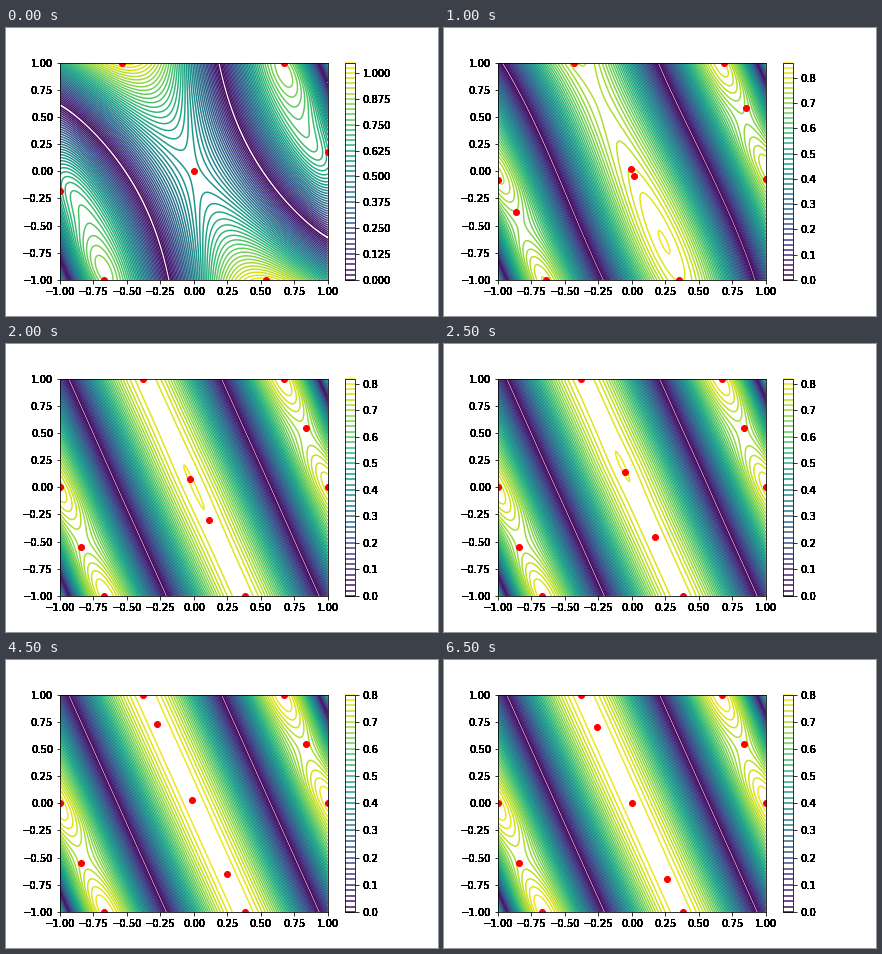
Write a matplotlib script that moves like this. It is 432x288 px and loops after 7000 ms.

```python
import numpy as np
import matplotlib.pyplot as plt
from matplotlib.animation import FuncAnimation

SLOPE = 0.365
PEAK = 0.797
VALLEY = 1.04

Y, X = np.mgrid[-1:1:201j, -1:1:201j]
U = X + SLOPE * Y


def settled_error():
    """Wave across U whose two valleys each have a saddle half way along."""
    v = U ** 2
    start = (PEAK + 0.8) / VALLEY ** 2
    wave = -0.8 + (v - VALLEY) ** 2 * (start + 0.28 * v)
    side = np.exp(-((np.abs(U) - 1.03) / 0.17) ** 2)
    return wave + 0.09 * side * np.sin(np.pi * Y) ** 2


BASE = settled_error()
QUAD = 0.4 * X ** 2 - 0.37 * X * Y + 0.25 * Y ** 2 - 0.24
CUBIC = (0.04 - 0.588 * Y + 0.456 * Y ** 3
         + U * (0.3 - 0.09 * Y - 0.65 * Y ** 2)
         + 0.77 * U ** 2 * Y - 0.33 * U ** 3)


def error(k):
    if k == 0:
        return BASE + QUAD
    if k < 3:
        return BASE + CUBIC * 0.15 ** (k - 1)
    if k < 8:
        # a small rise on the crest swings to the middle and shrinks
        j = k - 3
        mid = -1.05 * np.cos(np.pi * j / 2) * np.exp(-0.85 * j)
        width = 0.6 * 0.66 ** j
        return BASE + 0.004 * np.exp(-((Y - mid) / width) ** 2)
    return BASE


def mirrored(half):
    half = np.array(half)
    return np.vstack([half, -half])


FIRST = np.vstack([mirrored([(-0.54, 1), (0.67, 1), (1, 0.18)]), [(0, 0)]])
SECOND = np.array([(0.75, 1), (1, 0), (1, -0.33), (-0.09, 0.43), (0.2, -0.42),
                   (-1, -0.03), (-0.6, -1), (0.28, -1)])
SETTLED = mirrored([(-0.38, 1), (0.67, 1), (0.84, 0.545), (1, 0)])
LOOSE = np.array([(-0.42, 1), (0.68, 1), (0.85, 0.57), (1, -0.05),
                  (0.36, -1), (-0.65, -1), (-0.86, -0.42), (-1, -0.06)])


def crest(k):
    """Heights of the points on the central crest."""
    if k < 7:
        j = k - 3
        return np.array([0.02 + 0.06 * j, -0.14 - 0.16 * j])
    swing = np.exp(-0.6 * (k - 7)) * np.cos(np.pi * (k - 7) / 2)
    return np.array([0.7, 0, -0.7]) - np.array([0.1, 0.1, 0.15]) * swing


def points(k):
    if k < 2:
        return (FIRST, SECOND)[k]
    loose = max(0, 1 - 0.4 * (k - 3)) if k < 4 else 0
    outer = np.clip(SETTLED + loose * (LOOSE - SETTLED), -1, 1)
    y = crest(k)
    return np.vstack([outer, np.column_stack([-0.375 * y, y])])


def levels(top):
    step = 0.025 if top > 1 else 0.02
    return step * np.arange(np.ceil(top / step - 1e-6) + 1)


def harden(labels):
    """Paint each label many times so that its soft edges turn solid."""
    for label in labels:
        def repeat(renderer, draw=label.draw):
            for _ in range(20):
                draw(renderer)
        label.draw = repeat


plt.rcParams.update({"font.family": "DejaVu Sans", "font.size": 10})
fig = plt.figure(figsize=(6, 4), dpi=72, facecolor="white")
TICKS = np.linspace(-1, 1, 9)


def update(k):
    fig.clf()
    fig.subplots_adjust(left=0.125, right=0.9, bottom=0.125, top=0.88)
    ax = fig.add_subplot()
    size = np.abs(error(k))
    lev = levels(size.max())
    lines = ax.contour(X, Y, size, levels=lev, cmap="viridis",
                       vmin=0, vmax=lev[-1], linewidths=1.5)
    bar = fig.colorbar(lines, ax=ax, ticks=lev[::5])
    ax.plot(*points(k).T, "ro", markersize=6)
    ax.set(xlim=(-1, 1), ylim=(-1, 1), xticks=TICKS, yticks=TICKS)
    harden(ax.get_xticklabels() + ax.get_yticklabels() + bar.ax.get_yticklabels())
    return []


anim = FuncAnimation(fig, update, frames=14, interval=500, repeat=True,
                     repeat_delay=0, init_func=lambda: update(0), blit=False)
plt.show()
```
